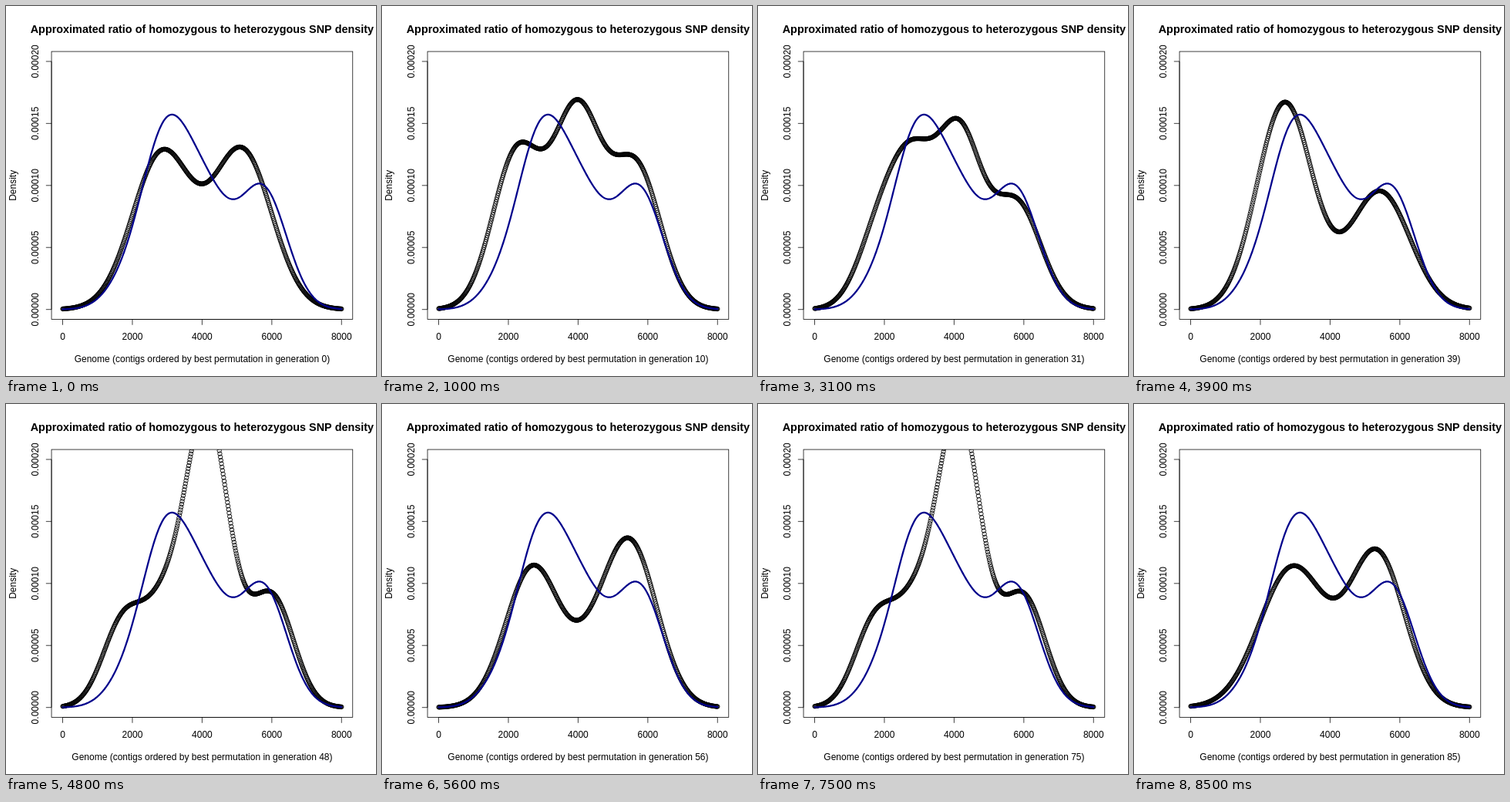
An HTML page with a canvas that plays this animation: 480x480 px, repeating every 8600 ms.

```html
<!DOCTYPE html>
<html lang="en">
<head>
<meta charset="utf-8">
<title>SNP density</title>
<style>
  html, body { margin: 0; width: 100%; height: 100%; overflow: hidden; background: #fff; }
  canvas { display: block; width: 480px; height: 480px; }
</style>
</head>
<body>
<canvas id="plot" width="480" height="480"></canvas>
<script>
const ctx = document.getElementById('plot').getContext('2d');
const STEP = 100, GENERATIONS = 86, POINTS = 512;
const BOX = { left: 59.04, top: 59.04, right: 449.76, bottom: 406.56 };
const X0 = 73.51, X1 = 435.29, Y0 = 393.69, Y1 = 71.91;
const FONT = '"Liberation Sans", Arial, Helvetica, sans-serif';

// Each curve is a sum of bell bumps: [centre in thousands, height in pixels, width in thousands]
const reference = [[1.65, 17, .55], [2.95, 225, .72], [4.2, 118, .68], [5.76, 153, .674]];
const twin = [[2.85, 202, .85], [5.15, 205, .85]];
const broad = [[2.25, 202, .7], [3.98, 253, .7], [5.67, 182, .7]];
const spire = [[1.75, 111, .6], [2.87, 121, .6], [4.15, 375, .6], [5.92, 144, .63]];
const leftHigh = [[2.7, 268, .8], [5.43, 153, .86]];
const rightHigh = [[2.7, 182, .77], [4.25, 37, .65], [5.48, 213, .78]];
const shouldered = [[1.7, 103, .57], [3.05, 100, .57], [4.05, 333, .6], [4.95, 104, .57], [6.2, 146, .57]];
const final = [[2.93, 182, .95], [5.35, 198, .79]];

const keys = [[0, twin], [5, spire], [10, broad], [23, spire], [39, leftHigh], [43, shouldered],
              [50, spire], [56, rightHigh], [65, shouldered], [78, spire], [82, shouldered], [85, final]];

const height = (bumps, g) =>
  bumps.reduce((sum, [c, h, w]) => sum + h * Math.exp(-((g - c) ** 2) / (2 * w * w)), 0);

// Blend of the two shapes around a generation
function curveAt(gen) {
  let i = 0;
  while (i < keys.length - 2 && gen >= keys[i + 1][0]) i++;
  const [g0, a] = keys[i], [g1, b] = keys[i + 1];
  const f = (gen - g0) / (g1 - g0);
  return g => height(a, g) * (1 - f) + height(b, g) * f;
}

function eachPoint(curve, visit) {
  for (let i = 0; i < POINTS; i++) {
    const u = i / (POINTS - 1);
    visit(X0 + (X1 - X0) * u, Y0 - curve(8 * u));
  }
}

function line(xa, ya, xb, yb) {
  ctx.beginPath();
  ctx.moveTo(xa, ya);
  ctx.lineTo(xb, yb);
  ctx.stroke();
}

function label(text, x, y, turned = false, font = '12px ') {
  ctx.save();
  ctx.translate(x, y);
  if (turned) ctx.rotate(-Math.PI / 2);
  ctx.font = font + FONT;
  ctx.textAlign = 'center';
  ctx.fillText(text, 0, 0);
  ctx.restore();
}

function drawAxes(gen) {
  const midX = (BOX.left + BOX.right) / 2, midY = (BOX.top + BOX.bottom) / 2;
  ctx.strokeStyle = ctx.fillStyle = '#000';
  ctx.lineWidth = .75;
  ctx.strokeRect(BOX.left, BOX.top, BOX.right - BOX.left, BOX.bottom - BOX.top);
  line(X0, BOX.bottom, X1, BOX.bottom);
  line(BOX.left, Y0, BOX.left, Y1);
  for (let i = 0; i < 5; i++) {
    const x = X0 + (X1 - X0) * i / 4, y = Y0 + (Y1 - Y0) * i / 4;
    line(x, BOX.bottom, x, BOX.bottom + 7.2);
    line(BOX.left, y, BOX.left - 7.2, y);
    label(String(i * 2000), x, 432.6);
    label((i * 0.00005).toFixed(5), 41.8, y, true);
  }
  label('Approximated ratio of homozygous to heterozygous SNP density', midX, 35, false, 'bold 14.4px ');
  label(`Genome (contigs ordered by best permutation in generation ${gen})`, midX, 461.6);
  label('Density', 12.6, midY, true);
}

function drawCurves(gen) {
  ctx.save();
  ctx.beginPath();
  ctx.rect(BOX.left, BOX.top, BOX.right - BOX.left, BOX.bottom - BOX.top);
  ctx.clip();
  ctx.lineWidth = .9;
  eachPoint(curveAt(gen), (x, y) => {
    ctx.beginPath();
    ctx.arc(x, y, 2.7, 0, 2 * Math.PI);
    ctx.stroke();
  });
  ctx.strokeStyle = '#00008b';
  ctx.lineWidth = 2.25;
  ctx.lineJoin = ctx.lineCap = 'round';
  ctx.beginPath();
  eachPoint(g => height(reference, g), (x, y) => ctx.lineTo(x, y));
  ctx.stroke();
  ctx.restore();
}

let shown = -1;
function frame() {
  const gen = Math.floor(performance.now() / STEP) % GENERATIONS;
  if (gen !== shown) {
    shown = gen;
    ctx.fillStyle = '#fff';
    ctx.fillRect(0, 0, 480, 480);
    drawAxes(gen);
    drawCurves(gen);
  }
  requestAnimationFrame(frame);
}
frame();
</script>
</body>
</html>
```
